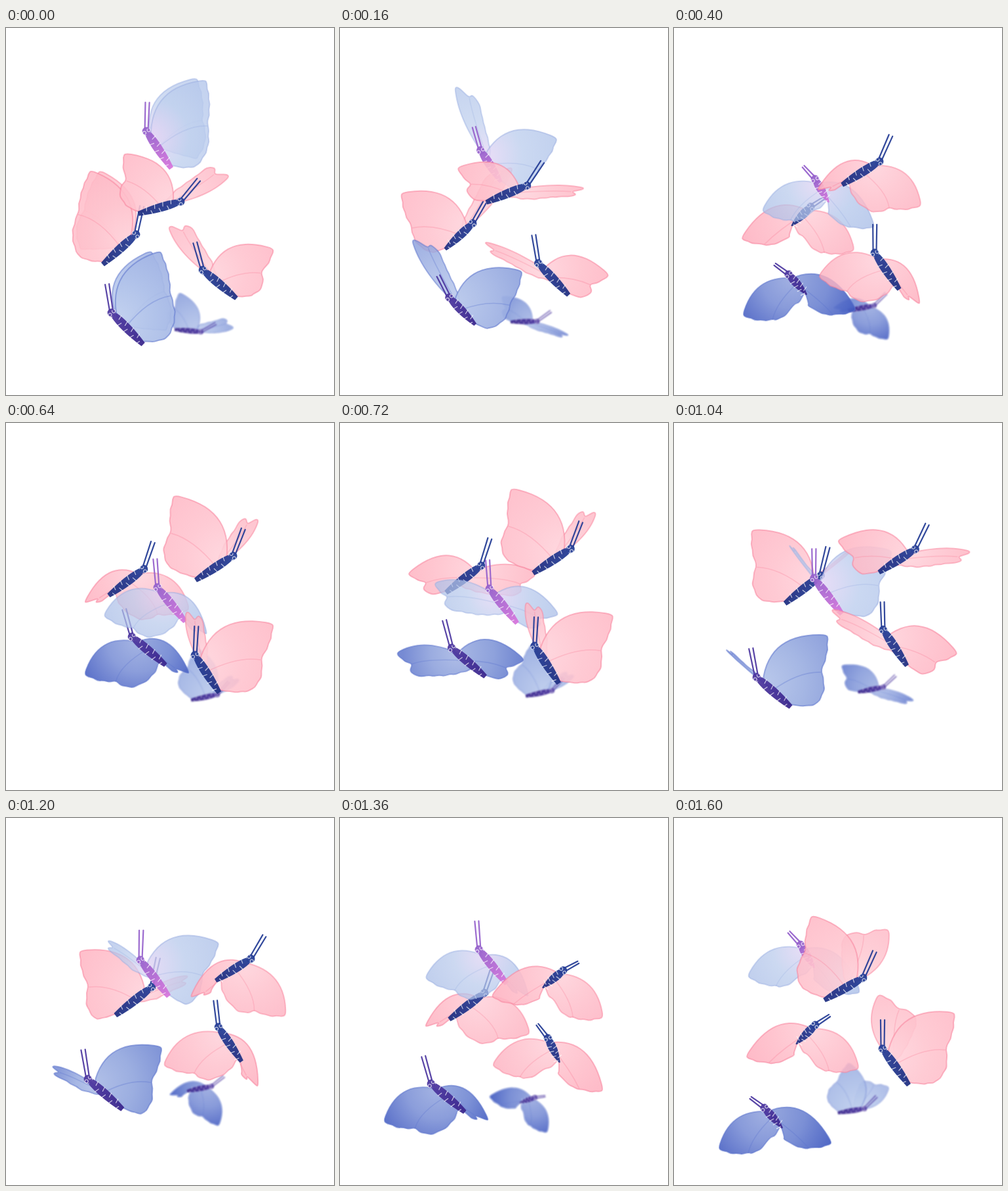
These frames come from a looping animation (500 by 558 pixels, 1.68 s). An HTML page with a canvas:

```html
<!DOCTYPE html>
<html lang="en">
<head>
<meta charset="utf-8">
<title>Butterflies</title>
<style>
  html, body { margin: 0; width: 100%; height: 100%; overflow: hidden; background: #fff; }
  canvas { display: block; width: 500px; height: 558px; }
</style>
</head>
<body>
<canvas id="stage" width="500" height="558"></canvas>
<script>
const ctx = document.getElementById('stage').getContext('2d');
const STEP = 80, LOOP = 1680, BODY = 68;
const KEYS = [0, 5, 8, 11, 15, 17, 20, 21];

const lerp = (a, b, t) => a + (b - a) * t;
const mix = (p, q, t) => p.map((v, i) => lerp(v, q[i], t));
const rgb = (c, a = 1) => `rgba(${c.map(Math.round).join()},${a})`;
const rad = deg => deg * Math.PI / 180;
const polar = (deg, r) => [r * Math.cos(rad(deg)), r * Math.sin(rad(deg))];

// Near wing: angle, reach, fan; far wing: the same; body length, tilt.
// Angles in degrees from the body axis, which runs from head to tail.
const POSES = {
  up:    [-97, 119, 36, 257, 111, 36, 68, 4],
  lift:  [-81, 122, 28, 211, 82, 28, 68, -3],
  high:  [-79, 128, 26, 201, 66, 12, 68, 0],
  sweep: [-57, 112, 20, 191, 83, 12, 67, -17],
  mid:   [-65, 122, 27, 160, 56, -8, 70, 0],
  glide: [-8, 103, 4, 102, 92, -32, 67, -1],
  down:  [0, 108, 4, 90, 101, -28, 63, -1],
  low:   [-21, 115, 15, 91, 93, -29, 41, 7]
};
const beat = names => names.split(' ').map(name => POSES[name]);
const BEAT_A = beat('up low glide high mid glide low');
const BEAT_B = beat('sweep glide high high down low lift');

const PINK = { glow: [255, 226, 231], lo: [255, 212, 219], hi: [252, 140, 163], rim: [248, 128, 155],
  head: [38, 62, 150], tail: [32, 48, 130], alpha: .88, tone: .3, shade: .12 };
const BLUE = { glow: [212, 225, 245], lo: [198, 214, 241], hi: [58, 84, 190], rim: [92, 116, 205],
  head: [78, 56, 160], tail: [58, 38, 140], alpha: .92, tone: .22, shade: .6 };
const LILAC = { ...BLUE, glow: [248, 224, 250], lo: [208, 222, 244], hi: [118, 146, 214], rim: [152, 172, 224],
  head: [150, 98, 204], tail: [216, 118, 220], alpha: .8, tone: .25, shade: .1 };

// flip -1 faces right; path gives the head at each key time
const flies = [
  { look: BLUE, beat: BEAT_B, flip: -1, lean: 12, size: .6, blur: 1.3,
    path: [[297, 462], [305, 422], [322, 413], [325, 395], [313, 408], [297, 425], [290, 442]] },
  { look: PINK, beat: BEAT_A, flip: -1, lean: 38, size: 1,
    path: [[198, 314], [208, 272], [210, 222], [225, 207], [222, 257], [220, 266], [215, 315]] },
  { look: BLUE, beat: BEAT_A, flip: 1, lean: 41, size: 1,
    path: [[161, 433], [175, 375], [192, 325], [127, 376], [125, 397], [139, 404], [138, 441]] },
  { look: LILAC, beat: BEAT_A, flip: 1, lean: 52, size: 1,
    path: [[214, 157], [215, 230], [231, 250], [222, 256], [205, 216], [212, 200], [193, 193]] },
  { look: PINK, beat: BEAT_B, flip: -1, lean: 33, size: 1,
    path: [[266, 264], [313, 203], [346, 202], [362, 170], [373, 214], [340, 232], [288, 243]] },
  { look: PINK, beat: BEAT_B, flip: 1, lean: 57, size: 1,
    path: [[300, 368], [306, 342], [288, 353], [314, 311], [324, 318], [317, 335], [318, 351]] }
];

// Closed outline with rounded corners
function smooth(pts) {
  const mid = i => mix(pts[i % pts.length], pts[(i + 1) % pts.length], .5);
  ctx.beginPath();
  ctx.moveTo(...mid(0));
  for (let i = 1; i <= pts.length; i++) ctx.quadraticCurveTo(...pts[i % pts.length], ...mid(i));
  ctx.closePath();
}

// Scalloped edge from a to b, swelling away from the body
function scallop(pts, a, b, swell) {
  const n = Math.max(3, Math.round(Math.hypot(a[0] - b[0], a[1] - b[1]) / 8));
  for (let i = 1; i <= n; i++) {
    const p = mix(a, b, i / n), len = Math.hypot(...p) || 1;
    const out = 1 + (Math.sin(Math.PI * i / n) * swell + (i % 2 ? 1.4 : -1)) / len;
    pts.push([p[0] * out, p[1] * out]);
  }
}

function wing(angle, reach, fan, bow, body, base, look, tone, alpha) {
  const root = [body * .17, 0];
  const tip = polar(angle, reach);
  const lead = polar(angle + bow, reach * .58);
  const notch = polar(angle + fan, reach * .78);
  const hind = polar(angle + fan * 2.1, reach * .78 * body / BODY);
  const pts = [root];
  for (let t = .125; t <= 1; t += .125) pts.push(mix(mix(root, lead, t), mix(lead, tip, t), t));
  scallop(pts, tip, notch, 5);
  scallop(pts, notch, hind, 9);
  scallop(pts, hind, [base, 0], 5);

  const fill = ctx.createRadialGradient(...root, 0, ...root, reach);
  fill.addColorStop(0, rgb(mix(look.glow, look.hi, tone * .55)));
  fill.addColorStop(.5, rgb(mix(look.lo, look.hi, tone * .75)));
  fill.addColorStop(1, rgb(mix(look.lo, look.hi, Math.min(1, tone * 1.25))));

  smooth(pts);
  ctx.globalAlpha = alpha;
  ctx.fillStyle = fill;
  ctx.fill();
  ctx.strokeStyle = rgb(look.rim, .6);
  ctx.lineWidth = 2;
  ctx.stroke();

  ctx.beginPath();
  ctx.moveTo(...notch);
  ctx.quadraticCurveTo(...mix(mix(root, notch, .55), tip, .12), body * .45, 0);
  ctx.globalAlpha = alpha * .6;
  ctx.lineWidth = 1.6;
  ctx.stroke();
}

function body(len, look) {
  const short = 1 - len / BODY;
  const end = 3.6 - short * 7, fat = 7.2;
  const ink = ctx.createLinearGradient(0, 0, len, 0);
  ink.addColorStop(0, rgb(look.head));
  ink.addColorStop(1, rgb(look.tail));
  ctx.globalAlpha = .94;
  ctx.fillStyle = ink;
  ctx.beginPath();
  ctx.arc(0, 0, 6.4, 0, 7);
  ctx.fill();
  ctx.beginPath();
  ctx.moveTo(len * .08, -5);
  ctx.quadraticCurveTo(len * .4, -fat * 1.3, len, -end);
  ctx.lineTo(len, end);
  ctx.quadraticCurveTo(len * .4, fat * 1.3, len * .08, 5);
  ctx.fill();

  // Pale slits between the rings, and the eyes
  ctx.strokeStyle = 'rgba(255,255,255,.75)';
  ctx.lineWidth = 1.2;
  ctx.beginPath();
  for (let i = 0; i < 8; i++) {
    const x = len * (.2 + i * .096), side = i % 2 ? 1 : -1;
    ctx.moveTo(x, side * fat);
    ctx.lineTo(x + 1.5, side * fat * .1);
  }
  for (const side of [-1, 1]) {
    ctx.moveTo(3, side * 4);
    ctx.arc(.5, side * 4, 2.5, 0, 7);
  }
  ctx.stroke();

  // Feelers tip forward as the body foreshortens
  const aim = 216 - 120 * short, reach = 44 * len / BODY;
  ctx.strokeStyle = rgb(look.head);
  ctx.lineWidth = 2.2;
  ctx.beginPath();
  for (const side of [-1, 1]) {
    ctx.moveTo(...polar(aim + side * 30, 5));
    ctx.lineTo(...polar(aim + side * 4, reach));
  }
  ctx.stroke();
}

function draw(frame) {
  let k = 0;
  while (frame >= KEYS[k + 1]) k++;
  const t = (frame - KEYS[k]) / (KEYS[k + 1] - KEYS[k]);
  const tween = list => mix(list[k], list[(k + 1) % list.length], t);

  ctx.clearRect(0, 0, 500, 558);
  ctx.lineCap = ctx.lineJoin = 'round';
  for (const { look, beat, flip, lean, size, blur, path } of flies) {
    const [near, nearReach, nearFan, far, farReach, farFan, len, tilt] = tween(beat);
    const drop = Math.max(0, Math.min(1, (211 - far) / 115));
    const tone = look.tone + look.shade * drop;
    ctx.save();
    ctx.filter = blur ? `blur(${blur}px)` : 'none';
    ctx.translate(...tween(path));
    ctx.scale(flip * size, size);
    ctx.rotate(rad(lean + tilt));
    wing(far, farReach, farFan, -1.4 * farFan, len, len * (.4 + .45 * drop), look, tone, look.alpha * .9);
    wing(near, nearReach, nearFan, -45, len, len * .9, look, tone, look.alpha);
    body(len, look);
    ctx.restore();
  }
}

const start = performance.now();
let shown = -1;
function tick() {
  const frame = Math.floor((performance.now() - start) % LOOP / STEP);
  if (frame !== shown) draw(shown = frame);
  requestAnimationFrame(tick);
}
tick();
</script>
</body>
</html>
```
